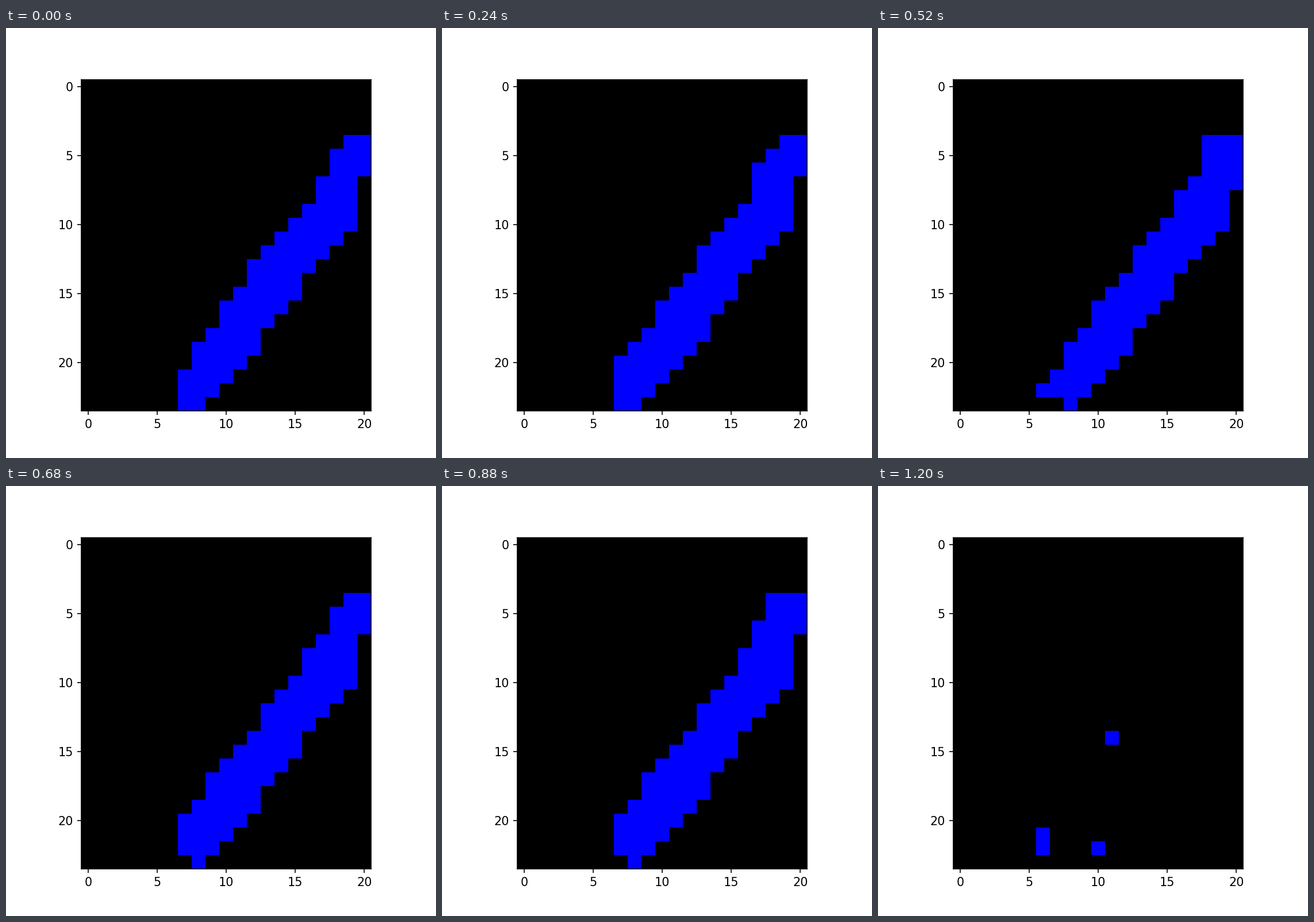
Animation of 748 by 748 pixels, one loop 1.24 s. Source, as a matplotlib script:

```python
import matplotlib.pyplot as plt
import numpy as np
from matplotlib.animation import FuncAnimation

SIZE, INCHES = 748, 5
ROWS, COLS = 24, 21
FRAMES, INTERVAL = 31, 40
TOP = 4

# Key points (row, column) of the two sides of the band, rows counted from TOP.
LEFT = [(0, 19.2), (4, 17.2), (8, 13.95), (13, 10.15), (16, 8.1), (18, 7.2), (19, 8.1)]
RIGHT = [(0, 20.7), (6, 19.1), (10, 15.8), (15, 12.2), (18, 9.9), (19, 8.2)]
SPECKS = [(14, 11), (21, 6), (22, 6), (22, 10)]


def side(points, noise):
    """Whole columns along one side after a noisy shift."""
    rows, cols = zip(*points)
    edge = np.interp(np.arange(ROWS - TOP), rows, cols)
    return np.floor(edge + noise).astype(int)


def grid(frame):
    img = np.zeros((ROWS, COLS, 3), dtype=np.uint8)
    if frame == FRAMES - 1:
        for row, col in SPECKS:
            img[row, col, 2] = 255
        return img
    # Noise only widens the band, so its rim flickers outwards.
    rng = np.random.default_rng(frame)
    spread = np.abs(rng.normal(size=(2, ROWS - TOP)))
    left = side(LEFT, -0.17 * spread[0])
    right = side(RIGHT, 0.08 * spread[1])
    for row, (a, b) in enumerate(zip(left, right), TOP):
        img[row, a:b + 1, 2] = 255
    return img


fig, ax = plt.subplots(figsize=(INCHES, INCHES), dpi=SIZE / INCHES)
picture = ax.imshow(grid(0), interpolation="nearest")
ax.set_xticks(range(0, COLS, 5))
ax.set_yticks(range(0, ROWS, 5))


def update(frame):
    picture.set_data(grid(frame))
    return [picture]


anim = FuncAnimation(fig, update, frames=FRAMES, interval=INTERVAL, repeat=True)
plt.show()
```
